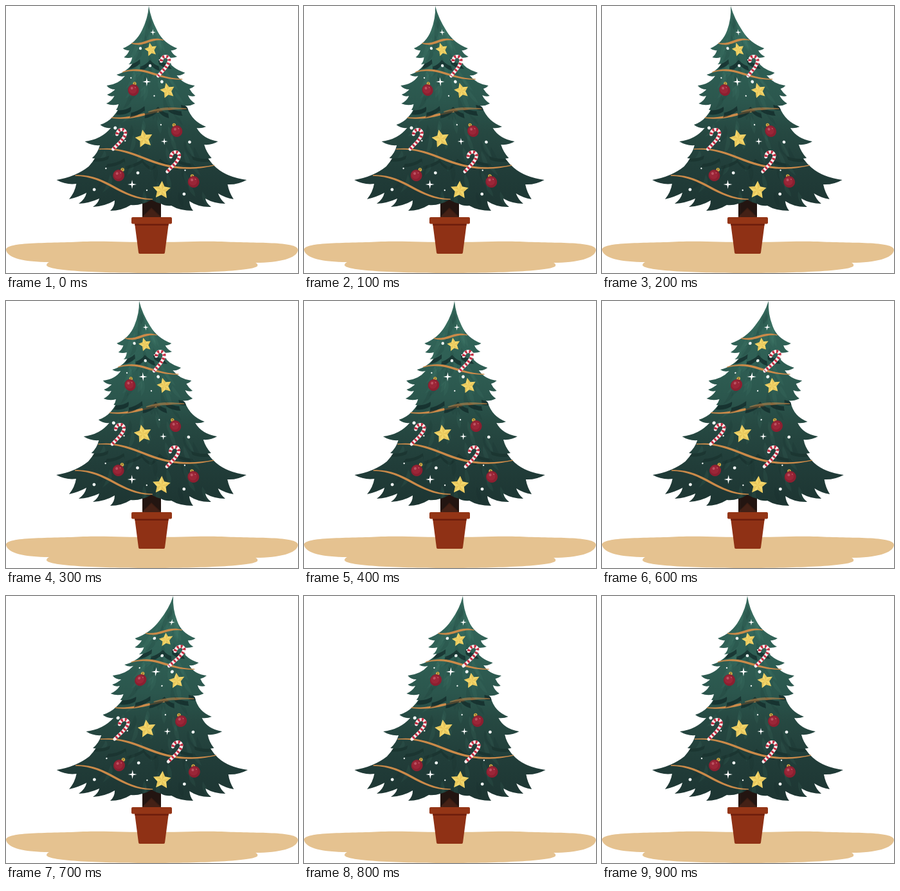
An HTML page with a canvas for the animation above (1000 ms loop, 454 by 416 pixels).

```html
<!DOCTYPE html>
<html lang="en">
<head>
<meta charset="utf-8">
<title>Swaying Christmas tree</title>
<style>
  html, body { margin: 0; width: 100%; height: 100%; overflow: hidden; background: #fff; }
  svg, canvas { position: absolute; left: 0; top: 0; width: 454px; height: 416px; display: block; }
</style>
</head>
<body>
<svg viewBox="0 0 454 416">
  <path fill="#e5c290" d="M0 380C0 367 70 370 120 367C160 366 185 368 227 368C270 368 295 366 335 367C385 370 454 366 454 380C453 393 425 400 388 400Q392 402 391 405C386 413 300 416 227 416C150 416 66 413 63 404Q63 401 67 399C30 399 2 393 0 380Z"/>
  <path fill="#3a1d13" d="M212 300H241V331H212Z"/>
  <path fill="#231511" d="M212 300H241V328L226 314L212 328Z"/>
  <path fill="#51291a" d="M212 329L226 316L240 329Z" opacity=".45"/>
  <path fill="#8f3115" d="M200 338H253L247 384Q247 386 245 386H208Q206 386 206 384Z"/>
  <path fill="#6d1d0c" d="M200 338H253L252.500 342H200.500Z"/>
  <rect x="195" y="329" width="63" height="10.500" rx="2" fill="#943516"/>
</svg>
<canvas id="tree" width="454" height="416"></canvas>
<script>
const canvas = document.getElementById('tree');
const ctx = canvas.getContext('2d');

// One pose per 100 ms: lean of the tip, change of width, softness
const poses = [
  [-4, -.14, .6], [-22, -.15, .6], [-26, -.15, .6], [-19, -.13, .6], [8, -.08, .5],
  [26, -.01, .4], [33, .01, .4], [34, .02, .3], [21, .01, .2], [0, 0, 0]
];
let lean = 0, widen = 0;

function bend(x, y) {
  const u = Math.max(0, (330 - y) / 330);
  return [x + lean * u ** 2.15 + widen * u * u * (x - 226), y];
}

function shape(d, dy = 0) {
  const p = new Path2D();
  for (const [, cmd, args] of d.matchAll(/([MLQCZ])([^MLQCZ]*)/g)) {
    const n = args.trim().split(/[\s,]+/).map(Number);
    const q = [];
    for (let i = 0; i + 1 < n.length; i += 2) q.push(...bend(n[i], n[i + 1] + dy));
    if (cmd === 'M') p.moveTo(...q);
    else if (cmd === 'L') p.lineTo(...q);
    else if (cmd === 'Q') p.quadraticCurveTo(...q);
    else if (cmd === 'C') p.bezierCurveTo(...q);
    else p.closePath();
  }
  return p;
}

function fill(d, color) {
  ctx.fillStyle = color;
  ctx.fill(shape(d));
}

function polygon(count, at) {
  let d = '';
  for (let i = 0; i < count; i++) d += (i ? 'L' : 'M') + at(i).join(' ');
  return d + 'Z';
}

const polar = (x, y, r, a) => [x + r * Math.cos(a), y + r * Math.sin(a)];
const disc = (x, y, r) => polygon(24, i => polar(x, y, r, i * Math.PI / 12));

// Tiers from the bottom up
const tiers = [
  'M226 190L150 215Q139 238 128 250Q108 266 78 271Q93 279 109 277Q107 290 98 301Q112 298 125 291Q123 301 113 308Q130 307 145 300Q143 308 135 313Q154 312 169 303Q169 313 162 319Q180 319 194 310Q203 311 212 308Q220 306 226 302Q233 306 241 308Q248 312 257 311Q270 319 291 319Q286 313 285 304Q300 314 319 313Q312 308 310 300Q324 308 341 308Q333 301 330 292Q341 299 354 301Q347 290 345 278Q360 279 375 271Q345 267 328 252Q316 242 306 220Z',
  'M226 120L180 148Q168 178 145 185Q152 191 162 190Q147 208 121 211Q132 218 145 217Q142 229 133 237Q148 239 160 233Q159 240 154 246Q172 246 184 237Q186 244 184 250Q202 246 212 239Q217 247 226 251Q234 247 240 238Q252 249 268 250Q266 244 265 238Q279 246 296 246Q291 241 290 234Q304 240 321 237Q313 228 310 216Q322 217 332 211Q308 207 299 190Q307 191 314 188Q292 180 285 158L270 145Z',
  'M226 68L202 82Q190 102 170 107Q176 111 184 109Q174 122 154 124Q159 130 168 130Q163 135 155 138Q160 142 167 140Q163 148 154 152Q164 156 174 153Q173 158 170 162Q184 164 194 157Q195 162 192 167Q206 164 216 156Q217 163 216 168Q229 166 238 157Q244 165 255 168Q254 162 254 157Q264 164 277 164Q275 160 275 154Q286 158 298 152Q290 147 287 139Q293 142 299 140Q293 135 290 129Q295 128 299 124Q280 122 270 108Q278 109 284 104Q263 98 254 82Z',
  'M226 0Q224 19 213 38Q202 58 180 66Q185 70 191 69Q189 75 182 80Q189 82 196 80Q195 87 190 91Q201 90 209 83Q210 90 208 95Q219 92 226 84Q233 92 242 94Q240 88 240 83Q250 91 262 91Q257 86 256 80Q264 82 272 79Q264 75 262 69Q267 70 273 66Q250 58 240 39Q229 20 226 0Z'
];
const spans = [[215, 305, 110], [150, 236, 80], [86, 156, 55], [22, 84, 30]];

function rng(seed) {
  return () => (seed = seed * 16807 % 2147483647) / 2147483647;
}

const needles = ctx.createLinearGradient(0, 0, 0, 320);
[[0, '#35695c'], [.27, '#2f6055'], [.47, '#2b564d'], [.6, '#264942'],
 [.8, '#213d39'], [1, '#1d3532']].forEach(s => needles.addColorStop(...s));

// Faint pointed sprays within a tier
function sprays(index) {
  const rand = rng(71 + index * 13), [top, bottom, half] = spans[index];
  for (let i = 0; i < 24; i++) {
    const v = rand(), y = top + (bottom - top) * v;
    const side = rand() * 2 - 1, x = 226 + side * half * (.35 + .65 * v);
    const l = 13 + rand() * 9, tx = x + side * 15;
    fill(`M${x} ${y - l / 2}Q${x - 4} ${y + l / 3} ${tx} ${y + l}Q${x + 10} ${y + l / 3} ${x} ${y - l / 2}Z`,
      i % 3 ? 'rgba(92,150,130,.09)' : 'rgba(10,30,30,.10)');
  }
}

function drawTier(d, i) {
  if (i) {
    ctx.save();
    ctx.clip(shape(tiers[i - 1]));
    ctx.fillStyle = i === 1 ? 'rgba(15,35,34,.35)' : 'rgba(16,38,37,.68)';
    ctx.fill(shape(d, i === 1 ? 5 : 7));
    ctx.restore();
  }
  fill(d, needles);
  ctx.save();
  ctx.clip(shape(d));
  sprays(i);
  ctx.restore();
}

function garland(x0, y0, x1, y1, x2, y2, x3, y3) {
  const t = 2.3;
  fill(`M${x0} ${y0 - .7}C${x1} ${y1 - t} ${x2} ${y2 - t} ${x3} ${y3 - .5}` +
    `L${x3} ${y3 + .7}C${x2} ${y2 + t} ${x1} ${y1 + t} ${x0} ${y0 + .7}Z`, '#cb8a49');
}

function cane(x, y) {
  const p = shape(`M${x - 7} ${y + 7}C${x - 6} ${y - 1} ${x + 3} ${y - 3} ${x + 6} ${y + 3}` +
    `C${x + 8} ${y + 8} ${x + 2} ${y + 14} ${x - 1} ${y + 18}L${x - 13} ${y + 30}`);
  ctx.lineWidth = 5;
  ctx.lineCap = 'round';
  ctx.strokeStyle = '#f6eeee';
  ctx.stroke(p);
  ctx.lineCap = 'butt';
  ctx.strokeStyle = '#c42b40';
  ctx.setLineDash([2.8, 3.2]);
  ctx.stroke(p);
  ctx.setLineDash([]);
}

function bauble(x, y, cx, cy) {
  fill(disc(cx, cy, 2.8), '#d8ae45');
  fill(disc(cx, cy - .6, 1.1), '#7d6a33');
  fill(disc(x, y, 9), '#8b1f30');
  fill(disc(x - 1, y - 1, 6.5), '#9b2638');
  fill(disc(x - 2.5, y - 3, 2), '#bd5262');
  fill(disc(x + 3, y - 4, 1), '#bd5262');
}

function star(x, y, r, turn) {
  const at = i => polar(x, y, i % 2 ? r * .5 : r, turn - Math.PI / 2 + i * Math.PI / 5);
  fill(polygon(10, at), '#f3d76b');
  for (let i = 0; i < 10; i += 2)
    fill(`M${x} ${y}L${at(i).join(' ')}L${at(i + 1).join(' ')}Z`, 'rgba(218,174,68,.42)');
}

function sparkle(x, y, r) {
  fill(polygon(8, i => polar(x, y, i % 2 ? r * .25 : r, i * Math.PI / 4)), '#fff');
}

const dots = [
  [210, 66, 2.3], [226, 93, 2.3], [242, 84, 1.1], [245, 118, 2.5], [194, 112, 1.2],
  [232, 140, 1.2], [169, 190, 2.6], [185, 210, 1.2], [242, 185, 1.2], [287, 212, 2.4],
  [155, 253, 1.2], [205, 260, 2.4], [137, 286, 2.4], [219, 287, 1.2], [279, 256, 1.2], [277, 293, 2.4]
];

function drawTree() {
  ctx.clearRect(0, 0, 454, 416);
  tiers.slice(0, 2).forEach(drawTier);
  garland(163, 174, 207, 178, 225, 159, 284, 160);
  drawTier(tiers[2], 2);
  // Ribbon showing dimly through the branches
  ctx.globalAlpha = .55;
  garland(222, 165, 240, 160, 258, 159, 284, 160);
  ctx.globalAlpha = 1;
  drawTier(tiers[3], 3);

  garland(195, 58, 218, 63, 226, 48, 250, 53);
  garland(180, 103, 218, 92, 235, 114, 279, 114);
  garland(144, 223, 210, 218, 232, 267, 325, 248);
  garland(107, 264, 157, 263, 178, 301, 228, 301);

  dots.forEach(d => fill(disc(...d), '#f4faf8'));
  sparkle(232, 41, 5);
  sparkle(220, 118, 7);
  sparkle(247, 211, 5.5);
  sparkle(196, 278, 7);

  bauble(198, 131, 200, 121);
  bauble(267, 195, 263, 185.5);
  bauble(175, 264, 181, 255);
  bauble(292, 274, 290, 265);

  star(228, 68, 11, -.2);
  star(254, 132, 12.5, -.2);
  star(215, 207, 14.5, -.18);
  star(242, 287, 14.5, .05);

  cane(252, 79);
  cane(179, 193);
  cane(264, 228);
}

let shown = -1;
function tick(now) {
  const step = Math.floor(now % 1000 / 100);
  if (step !== shown) {
    shown = step;
    const [l, w, soft] = poses[step];
    lean = l;
    widen = w;
    canvas.style.filter = soft ? `blur(${soft}px)` : 'none';
    drawTree();
  }
  requestAnimationFrame(tick);
}
tick(performance.now());
</script>
</body>
</html>
```
